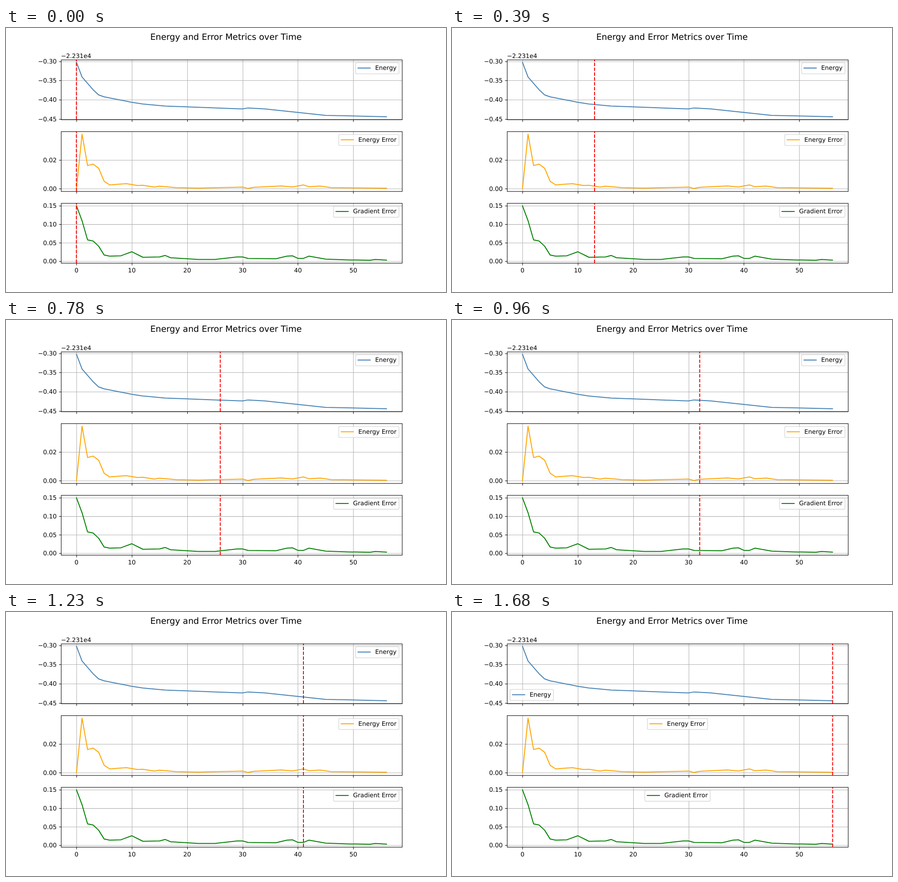
Animation of 966x580 px, one loop 1.71 s. Source, as an HTML page:

```html
<!DOCTYPE html>
<html lang="en">
<head>
<meta charset="utf-8">
<title>Energy and Error Metrics over Time</title>
<style>
  html, body { margin: 0; width: 100%; height: 100%; overflow: hidden; background: #fff; }
  svg { display: block; width: 966px; height: 580px; }
  text { font: 13.889px "DejaVu Sans", sans-serif; text-rendering: geometricPrecision; }
  .title { font-size: 19.444px; text-anchor: middle; }
  .grid { stroke: #b0b0b0; stroke-width: 1.111; }
  .axis { stroke: #000; stroke-width: 1.111; fill: none; }
  .curve { fill: none; stroke-width: 2.083; stroke-linejoin: round; stroke-linecap: square; }
  .cursor { stroke: #f00; stroke-width: 2.083; stroke-dasharray: 7.708 3.333; }
  .frame { fill: #fff; stroke: #ccc; stroke-width: 1.389; opacity: .8; }
</style>
</head>
<body>
<svg id="stage" viewBox="0 0 1000 600" preserveAspectRatio="none"></svg>
<script>
const STEP_MS = 30, STEPS = 57;
const LEFT = 125, RIGHT = 900, TOP = 72, HEIGHT = 462 / 3.4, PITCH = HEIGHT * 1.2;
const MARGIN = HEIGHT / 22;
const TICK = 4.861, INSET = 6.944, KEY_HEIGHT = 25.1, KEY_PAD = 5.556;

const snap = v => Math.round(v) + .5;
const xAt = step => LEFT + (step + 2.8) / 61.6 * (RIGHT - LEFT);

// Each curve joins a few [step, value] points; legends move to `aside` when reached.
const panels = [
  { name: 'Energy', color: 'steelblue', ticks: [-.3, -.35, -.4, -.45], aside: 'lower left',
    points: [[0, -.303], [1, -.3408], [3, -.3738], [4, -.3872], [5, -.3922], [10, -.4062],
      [12, -.4106], [16, -.416], [20, -.4182], [30, -.4235], [31, -.4209], [34, -.4235],
      [40, -.4324], [45, -.4401], [56, -.4437]] },
  { name: 'Energy Error', color: 'orange', ticks: [.02, 0], aside: 'upper center',
    points: [[0, 0], [1, .0381], [2, .0161], [3, .0171], [4, .0142], [5, .005], [6, .0025],
      [9, .0034], [11, .0021], [12, .0023], [14, .001], [15, .0016], [18, .0006], [22, .0003],
      [30, .001], [31, 0], [32, .0008], [37, .0018], [39, .0011], [41, .0025], [42, .0012],
      [44, .0017], [46, .0006], [56, .0002]] },
  { name: 'Gradient Error', color: 'green', ticks: [.15, .1, .05, 0], aside: 'upper center',
    points: [[0, .15], [1, .11], [2, .058], [3, .055], [4, .041], [5, .017], [6, .014],
      [8, .015], [10, .026], [12, .011], [15, .012], [16, .016], [17, .0098], [22, .005],
      [25, .005], [29, .012], [30, .012], [31, .0078], [36, .007], [38, .014], [39, .015],
      [40, .008], [41, .008], [42, .014], [45, .006], [49, .004], [53, .003], [54, .005],
      [56, .0034]] }
];

function add(parent, tag, attrs, label) {
  const el = document.createElementNS('http://www.w3.org/2000/svg', tag);
  for (const key in attrs) el.setAttribute(key, attrs[key]);
  if (label) el.textContent = label;
  return parent.appendChild(el);
}
const line = (parent, cls, x1, y1, x2, y2) =>
  add(parent, 'line', { class: cls, x1, y1, x2, y2 });

const stage = document.getElementById('stage');
add(stage, 'text', { class: 'title', x: 500, y: 27 }, 'Energy and Error Metrics over Time');
add(stage, 'text', { x: LEFT, y: 68 }, '−2.231e4');

// The legend is built at its own origin, so that it can be placed anywhere.
function drawLegend(panel, top, bottom) {
  const { name, color, aside } = panel;
  const group = add(stage, 'g', {});
  const frame = add(group, 'rect', { class: 'frame', height: KEY_HEIGHT, rx: 2.778 });
  add(group, 'path', { class: 'curve', stroke: color, d: `M${KEY_PAD} 12h27.78` });
  const text = add(group, 'text', { x: KEY_PAD + 38.89, y: 16.3 }, name);
  const width = text.getComputedTextLength() + 50;
  frame.setAttribute('width', width);

  const upper = Math.round(top + INSET);
  const lower = Math.round(bottom - INSET - KEY_HEIGHT);
  panel.legend = group;
  panel.home = [RIGHT - INSET - width, upper];
  panel.away = aside === 'lower left'
    ? [LEFT + INSET, lower]
    : [(LEFT + RIGHT - width) / 2, upper];
}

function drawPanel(panel, index) {
  const { color, ticks, points } = panel;
  const top = TOP + index * PITCH, bottom = top + HEIGHT;
  const values = points.map(p => p[1]);
  const max = Math.max(...values), min = Math.min(...values);
  const yAt = v => top + MARGIN + (max - v) / (max - min) * (HEIGHT - 2 * MARGIN);
  const x0 = snap(LEFT), x1 = snap(RIGHT), y0 = snap(top), y1 = snap(bottom);
  const columns = [0, 10, 20, 30, 40, 50];

  for (const n of columns) line(stage, 'grid', snap(xAt(n)), y0, snap(xAt(n)), y1);
  for (const v of ticks) line(stage, 'grid', x0, snap(yAt(v)), x1, snap(yAt(v)));

  const path = points.map(([n, v]) => `${xAt(n)},${yAt(v)}`).join(' ');
  add(stage, 'polyline', { class: 'curve', stroke: color, points: path });
  panel.cursor = line(stage, 'cursor', 0, Math.round(bottom), 0, Math.round(top));

  for (const n of columns) {
    const x = snap(xAt(n));
    line(stage, 'axis', x, y1, x, y1 + TICK);
    if (index === 2)
      add(stage, 'text', { x: xAt(n), y: 555, 'text-anchor': 'middle' }, String(n));
  }
  for (const v of ticks) {
    const y = yAt(v), label = v.toFixed(2).replace('-', '−');
    line(stage, 'axis', x0 - TICK, snap(y), x0, snap(y));
    add(stage, 'text', { x: LEFT - 2 * TICK, y: Math.round(y + 5), 'text-anchor': 'end' }, label);
  }
  add(stage, 'rect', { class: 'axis', x: x0, y: y0, width: x1 - x0, height: y1 - y0 });
  drawLegend(panel, top, bottom);
}
panels.forEach(drawPanel);

// A legend jumps aside once the cursor reaches its left edge.
function show(step) {
  const x = Math.round(xAt(step));
  for (const { cursor, legend, home, away } of panels) {
    cursor.setAttribute('x1', x);
    cursor.setAttribute('x2', x);
    legend.setAttribute('transform', `translate(${x > home[0] ? away : home})`);
  }
}

const start = performance.now();
function tick() {
  show(Math.floor((performance.now() - start) / STEP_MS) % STEPS);
  requestAnimationFrame(tick);
}
tick();
</script>
</body>
</html>
```
